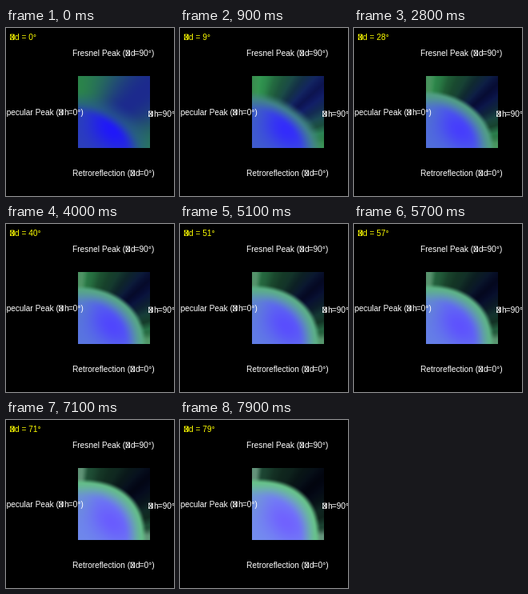
A matplotlib script that plays this animation: 210x210 px, repeating every 8000 ms.

```python
import numpy as np
import matplotlib.pyplot as plt
from matplotlib.animation import FuncAnimation

SIZE, DPI, FRAMES = 210, 100, 80
LEFT, TOP, SIDE = 90, 60, 90
FONT = 10.1 * 72 / DPI

fig = plt.figure(figsize=(SIZE / DPI, SIZE / DPI), dpi=DPI, facecolor="black")
ax = fig.add_axes([0, 0, 1, 1])
ax.axis("off")

# Slice coordinates: u runs right, v runs up, both 0..1
step = (np.arange(SIDE) + 0.5) / SIDE
u, v = np.meshgrid(step, 1 - step)
angle = np.arctan2(v, u) / (np.pi / 2)

# Faceted wedges: random brightness joined by straight ramps
rng = np.random.default_rng(4)
knots = np.linspace(0, 1, 16)
wedges = np.interp(angle, knots, rng.uniform(-1, 1, knots.size))


def rgb(*c):
    return np.array(c, float)


def mix(a, b, t):
    return a + (b - a) * np.asarray(t)[..., None]


def smooth(lo, hi, x):
    t = np.clip((x - lo) / (hi - lo), 0, 1)
    return t * t * (3 - 2 * t)


def bump(x, width):
    return np.exp(-(x / width) ** 2)


def background(t, settle):
    """Green flanks around a blue fan, darkening as the angle grows."""
    green = mix(rgb(44, 138, 70), rgb(24, 58, 42), t)
    blue = mix(mix(rgb(28, 42, 142), rgb(12, 20, 88), settle),
               rgb(3, 6, 18), t)
    fan = bump(angle - 0.45, 0.32 - 0.11 * settle)
    color = mix(green, blue, fan)
    color *= (1 - 0.3 * settle * bump(angle - 0.66, 0.12))[..., None]
    color *= (1 + 0.28 * settle * wedges)[..., None]
    corner = smooth(0.9, 0.97, angle) + smooth(0.12, 0.03, angle)
    pale = mix(rgb(60, 150, 80), rgb(118, 168, 142), t)
    return mix(color, pale, 0.8 * settle * corner)


def lobe(t, settle, r):
    """Blue lobe with a bright diagonal streak and a green rim."""
    base = mix(mix(rgb(44, 64, 186), rgb(62, 96, 206), settle),
               rgb(116, 142, 238), t)
    glow = mix(mix(rgb(32, 24, 250), rgb(48, 42, 252), settle),
               rgb(112, 98, 255), t)
    rim = mix(mix(rgb(40, 94, 140), rgb(70, 140, 128), settle),
              rgb(104, 196, 138), t)
    streak = bump(u + v - 0.72, 0.36) * bump(u - v - 0.22, 0.55)
    color = mix(base, glow, streak)
    color = mix(color, rim, 0.3 * smooth(0.35, 0, u) * smooth(0.1, 0.8, v))
    return mix(color, rim, smooth(0.7, 0.99, r))


def slice_image(n):
    t = n / (FRAMES - 1)
    settle = 1 - np.exp(-n / 7)
    power = 1.7 + 0.8 * t
    width = 0.92
    height = 0.66 + 0.08 * settle + 0.09 * t
    r = ((u / width) ** power + (v / height) ** power) ** (1 / power)
    soft = 0.24 - 0.19 * settle
    image = mix(lobe(t, settle, r), background(t, settle),
                smooth(1 - soft, 1 + soft, r))
    return np.clip(image, 0, 255).astype(np.uint8)


def write(x, y, text, color="white", ha="left"):
    return ax.text(x, y, text, color=color, ha=ha, va="baseline",
                   family="Liberation Sans", size=FONT)


def crossed_box(x, y, color):
    xs = x + 0.5 + 4.5 * np.array([0, 0, 1, 1, 0, 1, 1, 0])
    ys = y - 0.5 - 6.5 * np.array([0, 1, 1, 0, 0, 1, 0, 1])
    ax.plot(xs, ys, color=color, lw=0.5, solid_joinstyle="bevel",
            solid_capstyle="butt")


def label(x, y, before, after):
    write(x, y, before, ha="right")
    crossed_box(x, y, "white")
    write(x + 6.2, y, after)


picture = ax.imshow(slice_image(0), extent=(LEFT, LEFT + SIDE, TOP + SIDE, TOP),
                    interpolation="nearest", aspect="auto")

label(149.5, 35, "Fresnel Peak (", "d=90°)")
label(66, 109, "Specular Peak (", "h=0°)")
label(178, 111, "", "h=90°")
label(155.5, 185, "Retroreflection (", "d=0°)")
crossed_box(5, 15, "yellow")
counter = write(10.8, 15, "", "yellow")
ax.set(xlim=(0, SIZE), ylim=(SIZE, 0))


def update(n):
    picture.set_data(slice_image(n))
    counter.set_text(f"d = {n}°")
    return picture, counter


anim = FuncAnimation(fig, update, frames=FRAMES, interval=100,
                     repeat=True, repeat_delay=0, blit=False)
plt.show()
```
